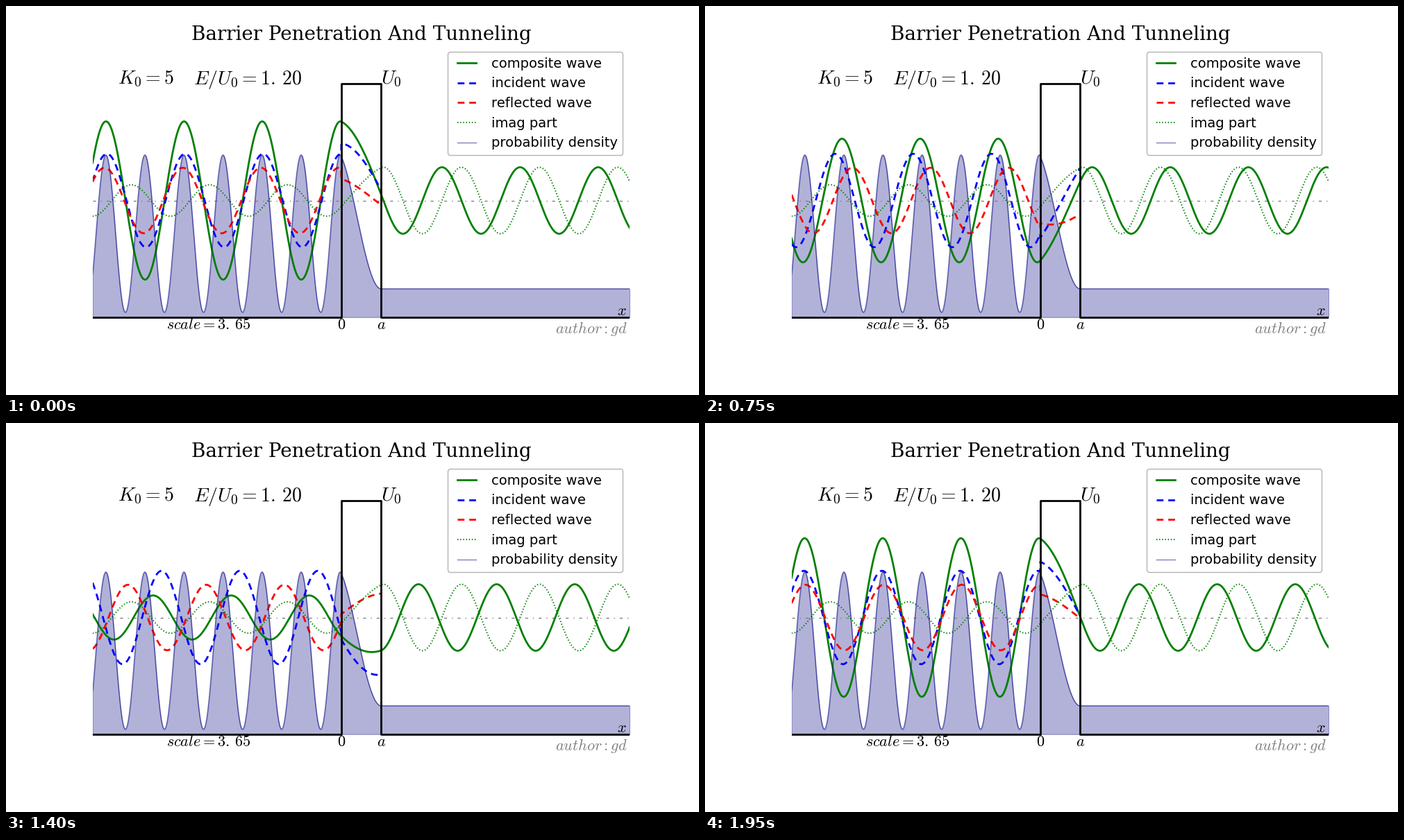
Recreate the animation shown at these times as a matplotlib script. Size 998 by 561 pixels, loop 2 s.

```python
import numpy as np
import matplotlib.pyplot as plt
from matplotlib.animation import FuncAnimation

W, H, DPI = 998, 561, 100
FRAMES, LOOP_MS = 40, 2000

plt.rcParams.update({
    "font.family": "DejaVu Sans",
    "mathtext.fontset": "cm",
    "lines.scale_dashes": False,
})

# Stationary state for a barrier on 0..a, with E > U0
K0, ratio = 5, 1.2
k = K0 * np.sqrt(ratio)
q = K0 * np.sqrt(ratio - 1)
scale = 20 / k
a = 0.16 * scale

T = 1 / (np.cos(q * a) - 0.5j * (k / q + q / k) * np.sin(q * a))
A = T / 2 * (1 + k / q) * np.exp(-1j * q * a)
B = T / 2 * (1 - k / q) * np.exp(1j * q * a)
R = A + B - 1

left = np.linspace(-scale, 0, 700)
mid = np.linspace(0, a, 120)
right = np.linspace(a, scale + a, 700)
x_in = np.concatenate([left, mid])
x_all = np.concatenate([x_in, right])

incident = np.concatenate([np.exp(1j * k * left), A * np.exp(1j * q * mid)])
reflected = np.concatenate([R * np.exp(-1j * k * left),
                            B * np.exp(-1j * q * mid)])
passed = T * np.exp(1j * k * (right - a))
psi = np.concatenate([incident + reflected, passed])

floor, top = -K0 / 2, K0 / 2
density = floor + ratio * np.abs(psi) ** 2

fig = plt.figure(figsize=(W / DPI, H / DPI), dpi=DPI, facecolor="white")
ax = fig.add_axes([0.125, 0.1, 0.775, 0.8])
ax.set_xlim(-scale, scale + a)
ax.set_ylim(-K0 / 1.5, K0 / 1.5)
ax.axis("off")
ax.set_title("Barrier Penetration And Tunneling", family="DejaVu Serif",
             fontsize=20, pad=5)

dash, dots, dashdot = (0, (7, 5)), (0, (1, 2)), (0, (3, 5, 1, 5))

ax.axhline(0, color="gray", lw=1, ls=dashdot)
ax.fill_between(x_all, floor, density, color="navy", alpha=0.3, lw=1)
composite, = ax.plot(x_all, psi.real, "g", lw=2, label="composite wave")
inc, = ax.plot(x_in, incident.real, "b", ls=dash, lw=2, label="incident wave")
ref, = ax.plot(x_in, reflected.real, "r", ls=dash, lw=2,
               label="reflected wave")
ax.plot(x_all, psi.imag, "g", ls=dots, lw=1.5, label="imag part")
ax.plot(x_all, density, color="navy", lw=1, alpha=0.5,
        label="probability density")
ax.plot([-scale, 0, 0, a, a, scale + a],
        [floor, floor, top, top, floor, floor], "k", lw=2)
ax.legend(loc="upper right", fontsize=14, numpoints=2, edgecolor="0.7",
          framealpha=1)


def label(x, y, text, size=16, ha="left", color="black"):
    """Math text with its baseline at pixel (x, y) from the top left."""
    fig.text(x / W, 1 - y / H, f"${text}$", fontsize=size, ha=ha,
             va="baseline", color=color)


def spaced(value):
    return f"{value:.2f}".replace(".", r".\hspace{0.2}")


label(160.6, 112.5, f"K_0={K0}", 20)
label(269.5, 112.5, f"E/U_0={spaced(ratio)}", 20)
label(540.1, 112.5, "U_0", 20)
label(292.3, 466.5, f"scale={spaced(scale)}", ha="center")
label(482.8, 466.5, "0", ha="center")
label(540.1, 466.5, "a", ha="center")
label(887, 446.5, "x", ha="center")
label(895.5, 472, "author:gd", ha="right", color="gray")


def update(i):
    turn = np.exp(-2j * np.pi * i / FRAMES)
    composite.set_ydata((psi * turn).real)
    inc.set_ydata((incident * turn).real)
    ref.set_ydata((reflected * turn).real)
    return composite, inc, ref


anim = FuncAnimation(fig, update, frames=FRAMES, interval=LOOP_MS / FRAMES,
                     repeat=True, repeat_delay=0)
plt.show()
```
